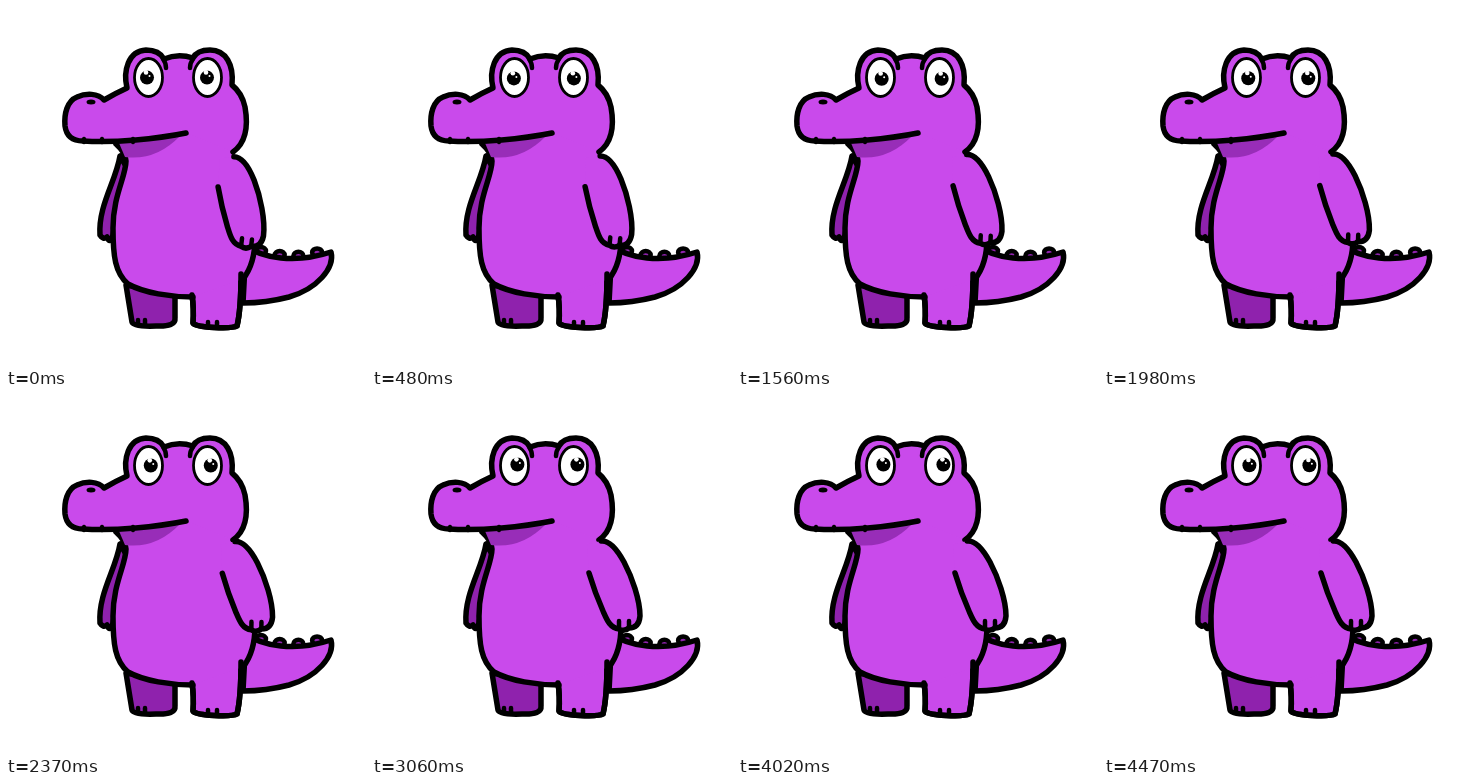
Recreate the animation shown at these times as an HTML page with a canvas. Size 360x360 px, loop 4500 ms.

```html
<!DOCTYPE html>
<html lang="en">
<head>
<meta charset="utf-8">
<title>Purple crocodile</title>
<style>
html, body { margin: 0; width: 100%; height: 100%; overflow: hidden; background: #fff; }
canvas { display: block; width: 360px; height: 360px; }
</style>
</head>
<body>
<canvas id="stage" width="360" height="360"></canvas>
<script>
const ctx = document.getElementById('stage').getContext('2d');
const LOOP = 4500;
const SKIN = '#c94aeb', SHADE = '#8f22ad', JAW = '#982db8', INK = '#000';
const SHOULDER = [198, 140];

const tail = new Path2D('M240 240 C256 252 289 258 325 246 C329 262 311 283 283 291 Q260 297 237 297 Z');
const farArm = new Path2D('M114 150 C110 175 92 200 94 229 Q97 234 101 231 Q104 239 107 229 L120 160 Z');
const farLeg = new Path2D('M120 279 L126 316 Q127 321 150 320 Q170 321 169 312 V287 Z');
const belly = new Path2D('M110 138 Q120 147 120 155 C120 170 107 190 107 222 C107 250 109 267 122 278 C138 287 165 291 187 291 L237 273 Q249 258 249 232 C249 205 240 175 229 152 L218 120 Z');
const bellyLine = new Path2D('M110 138 Q120 147 120 155 C120 170 107 190 107 222 C107 250 109 267 122 278 C138 287 165 291 187 291 M229 152 C240 175 249 205 249 232 Q249 258 237 273');
const nearLeg = new Path2D('M186 289 Q188 302 187 317 C190 322 226 323 231 320 Q235 304 235 268');
const jaw = new Path2D('M113 137 L174 130 Q150 155 119 151 Z');
const head = new Path2D('M227 146 C241 136 242 118 239 101 Q236 87 226 79 C228 59 220 44 204 44 Q191 44 187 52 Q172 47 158 53 Q153 44 140 44 C122 45 117 65 121 82 Q110 87 98 94 C92 87 80 87 71 91 C61 95 58 108 59 120 Q61 135 77 135 C110 137 150 133 180 127');
const brows = new Path2D('M157 53 Q160 57 160 62 M187 53 Q184 57 184 62');
const arm = new Path2D('M229 147 C238 146 246 157 252 168 C260 183 268 206 268 222 Q267 234 257 234 Q252 238 247 235 C238 234 235 226 231 217 Q223 199 217 179');
const armFill = new Path2D(arm);
armFill.lineTo(215, 150);

function smooth(t, from, to) {
  const u = Math.min(1, Math.max(0, (t - from) / (to - from)));
  return u * u * (3 - 2 * u);
}

function paint(p, fill, width = 5.5) {
  if (fill) { ctx.fillStyle = fill; ctx.fill(p); }
  if (width) { ctx.lineWidth = width; ctx.stroke(p); }
}

function oval(x, y, rx, ry = rx) {
  const p = new Path2D();
  p.ellipse(x, y, rx, ry, 0, 0, Math.PI * 2);
  return p;
}

// Two short strokes side by side: claws on feet and hands.
function claws(x, y, gap, height = 4) {
  for (const cx of [x, x + gap]) paint(new Path2D(`M${cx} ${y} v${-height}`), null, 4.5);
}

function drawTail() {
  for (let i = 0; i < 4; i++) {
    paint(oval(255 + 18.7 * i, 245 + 5 * Math.sin(i * 0.95), 5, 4), SHADE, 4.5);
  }
  paint(tail, SKIN);
}

function drawBody() {
  paint(farArm, SHADE);
  paint(farLeg, SHADE);
  paint(nearLeg, SKIN);
  paint(belly, SKIN, 0);
  paint(bellyLine);
  paint(nearLeg);
  claws(132, 318, 7);
  claws(202, 320, 9);
}

function drawHead() {
  paint(jaw, JAW, 0);
  paint(head, SKIN);
  paint(brows, null, 4.5);
  for (const x of [78, 96, 127]) paint(oval(x, 134.5, 2.4, 3.8), INK, 0);
  paint(oval(85, 96, 4.5, 2.5), INK, 0);
}

function drawArm(degrees) {
  ctx.save();
  ctx.translate(...SHOULDER);
  ctx.rotate(degrees * Math.PI / 180);
  ctx.translate(-SHOULDER[0], -SHOULDER[1]);
  paint(armFill, SKIN, 0);
  paint(arm);
  claws(247, 233, 10, 6);
  ctx.restore();
}

function drawEye(x, pupilX, pupilY, lid) {
  const eye = oval(x, 71.5, 14, 19);
  paint(eye, '#fff', 0);
  paint(oval(pupilX, pupilY, 7), INK, 0);
  paint(oval(pupilX - 1, pupilY - 5.2, 2.3), '#fff', 0);
  paint(oval(pupilX + 2.5, pupilY - 1.5, 1), '#fff', 0);
  if (lid > 0) {
    ctx.save();
    ctx.clip(eye);
    ctx.fillStyle = SKIN;
    ctx.globalAlpha = lid * 0.7;
    ctx.fillRect(x - 16, 50, 32, 44);
    ctx.fillRect(x - 16, 50, 32, 17);
    ctx.restore();
  }
  paint(eye, null, 2.8);
}

function draw(t) {
  const settle = 1 - Math.pow(1 - Math.min(1, t / 3060), 1.3);
  const lift = smooth(t, 3380, 3640) * (1 - smooth(t, 3680, 3980));
  const lid = smooth(t, 3560, 3640) * (1 - smooth(t, 3680, 3770));
  const gazeX = 4.4 * settle;
  const gazeY = 71.6 + 1.3 * Math.sin(t / 750);

  ctx.fillStyle = '#fff';
  ctx.fillRect(0, 0, 360, 360);
  ctx.strokeStyle = INK;
  ctx.lineCap = ctx.lineJoin = 'round';

  drawTail();
  drawBody();
  drawHead();
  drawArm(7 * (1 - settle) - 30 * lift);
  drawEye(142.5, 141 + gazeX, gazeY, lid);
  drawEye(201.5, 201 + gazeX, gazeY, lid);
}

const start = performance.now();
function tick() {
  draw((performance.now() - start) % LOOP);
  requestAnimationFrame(tick);
}
tick();
</script>
</body>
</html>
```
